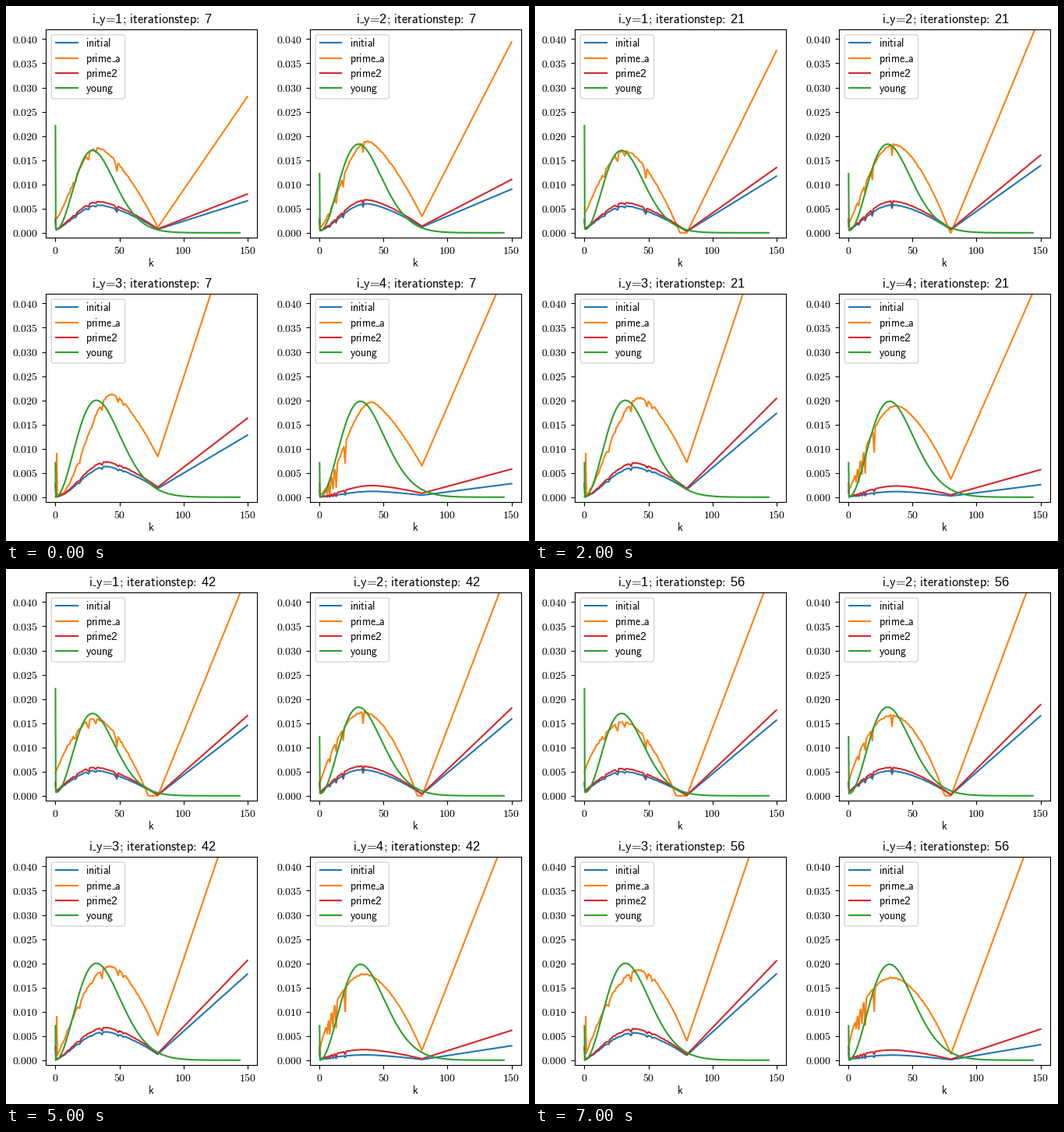
Write a matplotlib script that moves like this. It is 671x686 px and loops after 8000 ms.

```python
import numpy as np
import matplotlib.pyplot as plt
from matplotlib.animation import FuncAnimation
from matplotlib.patches import FancyBboxPatch

plt.rcParams["mathtext.fontset"] = "cm"
plt.rcParams["font.family"] = "Liberation Sans"

W, H, DPI = 671, 686, 100
BLUE, ORANGE, RED, GREEN = "#1f77b4", "#ff7f0e", "#d62728", "#2ca02c"
UNIT = 1e-4
K = np.arange(0, 80.5, 0.5)

# A hump is (base, peak, peak k, rise power, level at k=80, fall power), given
# for the first and last step. Heights are in UNIT; dips are (k, share of peak).
PANELS = [
    dict(prime_a=[(28, 175, 33, 1.4, 11, 1.5), (50, 152, 31, 0.85, -57, 1.7)],
         initial=[(6, 57, 34, 1.4, 7, 1.5), (9, 50, 31, 1.1, 1, 1.5)],
         sink_pace=0.6, ratio=1.125, first=25, spike=0,
         a_end=[281, 327, 410, 488], red_end=[80, 114, 149, 177], gap=[14, 21],
         dips=[(16, 0.07), (26, 0.1), (31.5, 0.05), (48, 0.11)], dip_width=2,
         jitter=0.013, young=(221, 170, 29, 8)),
    dict(prime_a=[(10, 189, 38, 1.45, 34, 1.4), (25, 166, 34, 0.8, -37, 1.84)],
         initial=[(4, 60, 37, 1.45, 12, 1.45), (6, 51.5, 33, 0.95, 2, 1.6)],
         sink_pace=1, ratio=1.135, first=25, spike=0,
         a_end=[394, 421, 467, 498], red_end=[110, 145, 171, 188], gap=[20, 23],
         dips=[(8, 0.07), (13, 0.11), (18.5, 0.12), (34, 0.12)], dip_width=1,
         jitter=0.009, young=(122, 183, 30.5, 5)),
    dict(prime_a=[(1, 212, 45, 2.05, 84, 1.4), (1, 185, 44, 0.9, 40, 1.62)],
         initial=[(1, 63, 40, 1.8, 18, 1.45), (1, 56, 39, 1.25, 10, 1.6)],
         sink_pace=2, ratio=1.15, first=25, spike=90,
         a_end=[652, 643, 616, 586], red_end=[163, 199, 207, 205], gap=[35, 27],
         dips=[(19, 0.04), (36.5, 0.08), (49, 0.04), (53, 0.04)], dip_width=1.5,
         jitter=0.016, young=(71, 200, 32, 0)),
    dict(prime_a=[(5, 196, 41, 1.6, 65, 1.36), (20, 170, 34, 0.65, 13, 1.8)],
         initial=[(0.5, 12, 41, 1.5, 4, 1.5), (1, 10.5, 35, 0.8, 1, 1.5)],
         sink_pace=1, ratio=2, first=14, spike=0,
         a_end=[493, 448, 466, 513], red_end=[58, 55, 58, 64], gap=[30, 32],
         dips=[(6, 0.1), (8, 0.18), (10.5, 0.18), (13, 0.26), (20, 0.24)],
         dip_width=1, jitter=0.008, young=(71, 198, 32, 0)),
]


def hump(base, peak, mid, rise, sink, fall):
    """Sine-like rise to the peak, then a power-law fall to k=80."""
    up = np.sin(np.pi / 2 * np.clip(K / mid, 0, 1)) ** rise
    down = np.clip((K - mid) / (80 - mid), 0, 1) ** fall
    return np.where(K < mid, base + (peak - base) * up, peak - (peak - sink) * down)


def young(spike, peak, mid, offset):
    k = np.linspace(0.3, 144, 289)
    r = k / mid
    y = peak * r**2 * np.exp(2 / 1.68 * (1 - r**1.68)) + offset * np.exp(-k / 6)
    return np.r_[0, k], np.r_[spike, y] * UNIT


def wiggle(dips, width, jitter, seed):
    """Saw-tooth dips plus small random kinks, as shares of the peak."""
    rng = np.random.default_rng(seed)
    knots = np.arange(0, 81, 1.0)
    kinks = jitter * rng.uniform(-1, 1, 81) * np.clip((78 - knots) / 30, 0, 1)
    y = np.interp(K, knots, kinks) * np.clip(K / 8, 0, 1)
    for k, depth in dips:
        y -= depth * np.interp(K, [k - width, k, k + 0.8], [0, 1, 0])
    return y


def sans(text):
    return r"$\mathsf{%s}$" % text


def digits(n):
    return r"\mathregular{%d}" % n


fig = plt.figure(figsize=(W / DPI, H / DPI), dpi=DPI, facecolor="white")
page = fig.add_axes([0, 0, 1, 1], zorder=5)
page.set(xlim=(0, W), ylim=(H, 0))
page.axis("off")


def legend(x, y):
    page.add_patch(FancyBboxPatch(
        (x + 7.1, y + 6.9), 94.4, 82, boxstyle="round,pad=0,rounding_size=2.8",
        fc="white", ec="0.8", lw=1, alpha=0.8))
    entries = [("initial", BLUE), (r"prime\hspace{0.41}a", ORANGE),
               ("prime" + digits(2), RED), ("young", GREEN)]
    for i, (name, color) in enumerate(entries):
        ly = y + 17.4 + 19.3 * i
        page.plot([x + 12.7, x + 40.4], [ly, ly], color=color, lw=1.5)
        page.text(x + 51.2, ly + 4.9, sans(name), size=10, va="baseline")
    page.plot([x + 84.4, x + 88.6], [y + 41.2] * 2, color="k", lw=0.6,
              solid_capstyle="butt")


class Panel:
    def __init__(self, index, spec):
        self.spec = spec
        self.number = index + 1
        self.x, self.y = 51.1 + 338.9 * (index % 2), 30 + 339 * (index // 2)
        self.wiggle = wiggle(spec["dips"], spec["dip_width"], spec["jitter"], index)

        ax = fig.add_axes([self.x / W, 1 - (self.y + 267) / H, 270.9 / W, 267 / H])
        ax.set(xlim=(-7.5, 157.5), ylim=(-0.001, 0.042))
        xs, ys = np.arange(4) * 50, np.arange(9) * 0.005
        ax.set_xticks(xs, [r"$\mathrm{%d}$" % v for v in xs])
        ax.set_yticks(ys, [r"$\mathrm{%.3f}$" % v for v in ys])
        self.blue, self.orange, self.red = (
            ax.plot([], [], color=c, lw=1.5)[0] for c in (BLUE, ORANGE, RED))
        ax.plot(*young(*spec["young"]), color=GREEN, lw=1.5)

        legend(self.x, self.y)
        page.text(self.x + 135.5, self.y + 304, sans("k"), size=10,
                  ha="center", va="baseline")
        self.title = page.text(0, self.y - 8.4, "", size=11.75, va="baseline")
        self.rule, = page.plot([], [], color="k", lw=0.7, solid_capstyle="butt")

    def curve(self, name, late, pace):
        first, last = np.array(self.spec[name], float)
        shape = first + (last - first) * pace
        y = hump(*shape) + shape[1] * self.wiggle * (0.85 + 0.3 * late)
        return np.maximum(y, 0)

    def update(self, step):
        s = self.spec
        doublings = np.log2(step / 7)
        late, linear = doublings / 3, (step - 7) / 49
        pace = np.array([late, linear, late, late, late ** s["sink_pace"], late])

        def end(values):
            return np.interp(doublings, range(4), values)

        a = self.curve("prime_a", late, pace)
        a[2] = max(a[2], s["spike"])
        b = self.curve("initial", late, pace)
        b[0] = s["first"]
        red_end = end(s["red_end"])
        blue_end = red_end - np.interp(late, [0, 1], s["gap"])
        k = np.r_[K, 150]
        self.orange.set_data(k, np.r_[a, end(s["a_end"])] * UNIT)
        self.blue.set_data(k, np.r_[b, blue_end] * UNIT)
        self.red.set_data(k, np.r_[b * s["ratio"], red_end] * UNIT)

        left = self.x + 59 - 4.4 * (len(str(step)) - 1)
        self.title.set_x(left)
        self.title.set_text(sans(
            r"i\hspace{0.41}y\hspace{-0.2}=\hspace{-0.2}%s;\hspace{0.17}"
            r"iterationstep\hspace{-0.2}:\hspace{0.27}%s"
            % (digits(self.number), digits(step))))
        self.rule.set_data([left + 4.9, left + 9.8], [self.y - 8.8] * 2)


panels = [Panel(i, spec) for i, spec in enumerate(PANELS)]


def draw(frame):
    for panel in panels:
        panel.update(7 * (frame + 1))
    return []


anim = FuncAnimation(fig, draw, frames=8, interval=1000, repeat=True, repeat_delay=0)
plt.show()
```
